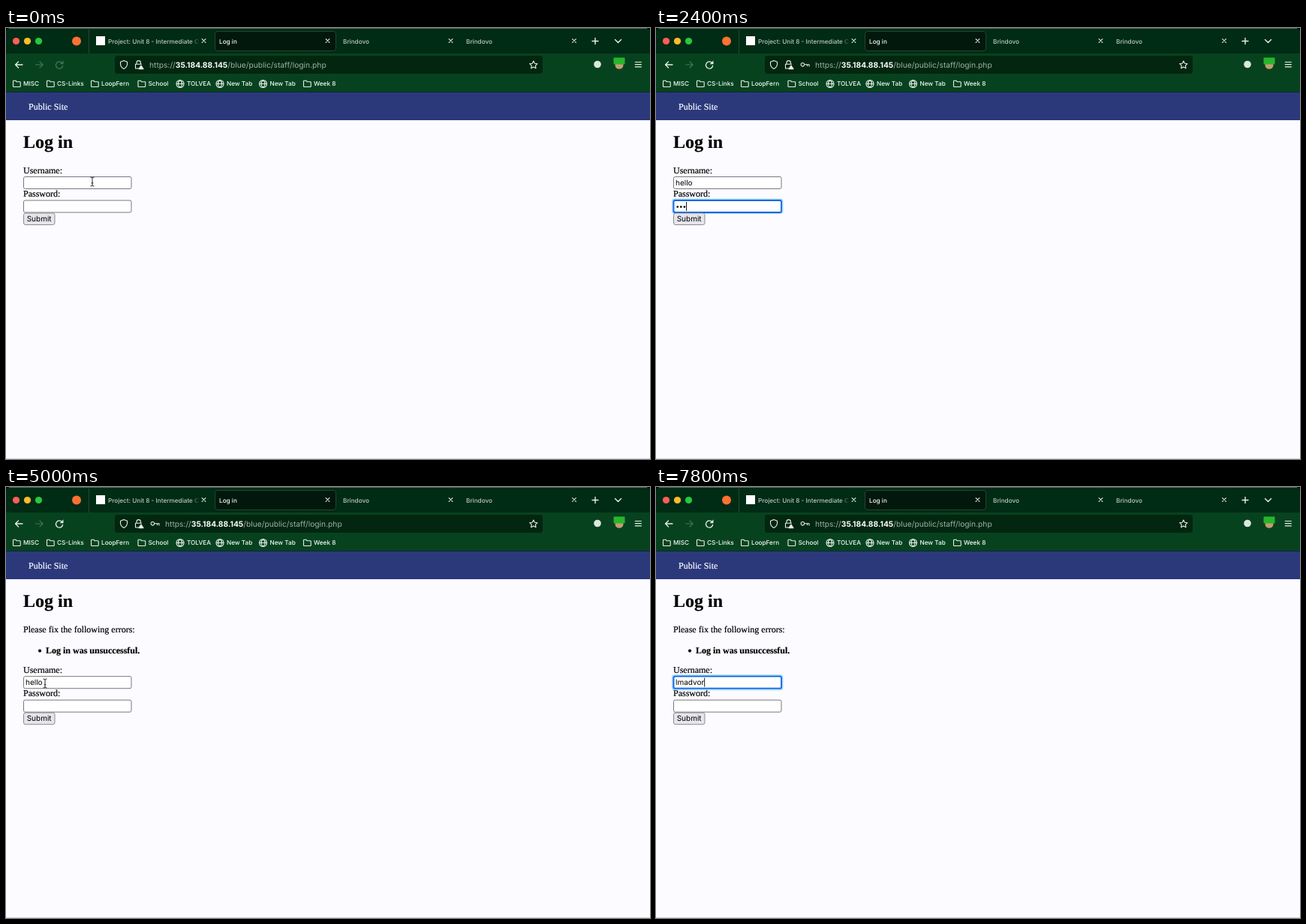
An HTML page for the animation above (8000 ms loop, 858 px wide and 575 px high).

```html
<!DOCTYPE html>
<html lang="en">
<head>
<meta charset="utf-8">
<title>Log in</title>
<style>
html, body { margin: 0; width: 100%; height: 100%; overflow: hidden; background: #fcfbff; }
svg { display: block; width: 858px; height: 575px; }
text { white-space: pre; text-rendering: geometricPrecision; }
.ui { font: 500 8.2px Inter, Roboto, sans-serif; fill: #b9cbbf; }
.bright { fill: #f6faf7; }
.url { font: 10.25px Inter, Roboto, sans-serif; fill: #9db3a4; }
.host { font-weight: 700; fill: #fff; }
.page { font: 12px "Liberation Serif", "Noto Serif", serif; fill: #000; stroke: #000; stroke-width: .2; }
.page .bright { fill: #fff; stroke: #fff; }
.control { font: 10px Inter, Roboto, sans-serif; fill: #000; }
.line { fill: none; stroke: #e8f0ea; stroke-width: 1.1; stroke-linecap: round; stroke-linejoin: round; }
.field { fill: #fff; stroke: #777780; }
.ring { fill: none; stroke: #a9d6fb; stroke-width: 2; }
.focus .field { stroke: #0868e0; stroke-width: 1.8; }
g:not(.focus) > .ring { display: none; }
#reload.off { opacity: .28; }
</style>
</head>
<body>
<svg viewBox="0 0 858 575" xmlns="http://www.w3.org/2000/svg">
  <defs>
    <linearGradient id="fade"><stop stop-color="#002b14" stop-opacity="0"/><stop offset="1" stop-color="#002b14"/></linearGradient>
    <radialGradient id="glow"><stop stop-color="#2c7a47"/><stop offset=".7" stop-color="#25683b"/><stop offset="1" stop-color="#1d5731" stop-opacity="0"/></radialGradient>
    <clipPath id="tabClip"><rect x="279" y="5" width="160" height="25" rx="3"/></clipPath>
    <clipPath id="titleClip"><rect x="130" y="8" width="127" height="20"/></clipPath>
    <path id="folder" d="M.5 8V1.2Q.5.5 1.2.5H3.8L5 2H9.3Q10.2 2 10.2 2.9V8Q10.2 8.8 9.4 8.8H1.3Q.5 8.8.5 8Z"/>
    <path id="globe" d="M5 0A5 5 0 1 1 5 10A5 5 0 1 1 5 0ZM.2 5H9.8M5 0C1.5 3 1.5 7 5 10C8.5 7 8.5 3 5 0"/>
    <path id="close" d="M-2.4-2.4L2.4 2.4M2.4-2.4L-2.4 2.4"/>
  </defs>

  <rect width="858" height="575" fill="#fcfbff"/>
  <rect width="858" height="35" fill="#002b14"/>
  <rect y="34" width="858" height="52" fill="#07421f"/>
  <path d="M0 0H5Q0 0 0 5ZM858 0H853Q858 0 858 5Z" fill="#000"/>
  <path d="M4 .5H854" stroke="#5c6a61"/>
  <path d="M110.5 2V34" stroke="#24492f"/>
  <circle cx="13.5" cy="17.5" r="4.6" fill="#fe5f57"/>
  <circle cx="28.5" cy="17.5" r="4.6" fill="#febc2e"/>
  <circle cx="43.5" cy="17.5" r="4.6" fill="#28c840"/>
  <circle cx="94" cy="17.5" r="6" fill="#ff7033"/>
  <rect x="120" y="11" width="12" height="12" fill="#fff"/>

  <rect x="278.5" y="4.5" width="161" height="26" rx="3.5" fill="#03180d" stroke="#22452f"/>
  <g clip-path="url(#tabClip)"><circle id="burst" cx="284" cy="17" fill="url(#glow)"/></g>
  <g class="ui">
    <text x="136" y="20.7" clip-path="url(#titleClip)">Project: Unit 8 - Intermediate C</text>
    <rect x="246" y="8" width="12" height="20" fill="url(#fade)"/>
    <text class="bright" x="284" y="20.7">Log in</text>
    <text x="449" y="20.7">Brindovo</text>
    <text x="613" y="20.7">Brindovo</text>
  </g>
  <g class="line">
    <use href="#close" x="263.5" y="17"/><use href="#close" x="428.5" y="17"/>
    <use href="#close" x="592.5" y="17"/><use href="#close" x="757" y="17"/>
    <path d="M781 17.5H789M785 13.5V21.5M811.5 15.5L815.5 19.5L819.5 15.5" stroke-width="1.4"/>
    <path d="M22 49H12.5M16.5 45L12.5 49L16.5 53" stroke-width="1.3"/>
    <path d="M39.5 49H49M45 45L49 49L45 53" stroke="#487357" style="stroke:#487357"/>
    <g id="reload">
      <path d="M74.6 46.6A4.6 4.6 0 1 0 75.6 50.3" stroke-width="1.3"/>
      <path d="M76.2 44.2V48H72.4Z" fill="#e8f0ea" stroke-width=".5"/>
    </g>
    <path id="stop" d="M67.5 45.5L74.5 52.5M74.5 45.5L67.5 52.5" stroke-width="1.3"/>
  </g>

  <rect x="145" y="37" width="570" height="24" rx="3.5" fill="#032610"/>
  <g class="line">
    <path d="M157 43.5L161.5 45.2V48.5Q161 52.5 157 54.5Q153 52.5 152.5 48.5V45.2Z"/>
    <path d="M174 48V46.3A2.7 2.7 0 0 1 179.4 46.3V48M177 54H172.5V48.2H180.5"/>
    <path d="M180 50L183 54.6H177Z" fill="#e8f0ea"/>
    <path id="key" d="M197.7 48.8A2.3 2.3 0 1 1 193.1 48.8A2.3 2.3 0 1 1 197.7 48.8H204V51M201.5 48.8V50.6"/>
    <path d="M702.8 44L704.4 47.2L708 47.7L705.4 50.2L706 53.8L702.8 52.1L699.6 53.8L700.2 50.2L697.6 47.7L701.2 47.2Z"/>
    <path d="M838.3 45.5H846.3M838.3 48.7H846.3M838.3 51.9H846.3" stroke-width="1.2"/>
  </g>
  <text id="url" class="url" x="191" y="53">https://<tspan class="host">35.184.88.145</tspan>/blue/public/staff/login.php</text>
  <circle cx="788" cy="48.5" r="4.8" fill="#dce7df"/>
  <ellipse cx="817" cy="49.5" rx="5.5" ry="5.3" fill="#c79a72"/>
  <rect x="809.5" y="39.5" width="15" height="9" rx="1" fill="#27b52c"/>
  <g id="bookmarks" class="ui"></g>

  <rect y="85" width="858" height="38" fill="#2b397b"/>
  <path d="M0 85.5H858" stroke="#0c2a35"/>
  <path d="M0 574.5H858" stroke="#d5d4d9"/>
  <g class="page">
    <text class="bright" x="30" y="108.8">Public Site</text>
    <text x="23" y="159.6" style="font-size:24px;font-weight:bold">Log in</text>
    <g id="errors">
      <text x="23" y="194.2">Please fix the following errors:</text>
      <circle cx="45" cy="218.5" r="2"/>
      <text x="53" y="222" font-weight="bold">Log in was unsuccessful.</text>
    </g>
  </g>
  <g id="form">
    <g class="page"><text x="23" y="194.2">Username:</text><text x="23" y="225">Password:</text></g>
    <g id="user">
      <rect class="ring" x="22" y="197" width="146.5" height="19" rx="3"/>
      <rect class="field" x="23.5" y="198.5" width="143.5" height="16" rx="2"/>
      <rect id="selection" x="26" y="200.5" height="12" fill="#a9cdf5"/>
      <text id="name" class="control" x="26" y="210.2"></text>
    </g>
    <g id="pass">
      <rect class="ring" x="22" y="228.5" width="146.5" height="18.5" rx="3"/>
      <rect class="field" x="23.5" y="230" width="143.5" height="16" rx="2"/>
      <g id="dots"></g>
    </g>
    <path id="caret" stroke="#000" stroke-width=".9"/>
    <rect x="23.5" y="247" width="41.5" height="15.5" rx="2.5" fill="#e6e5eb" stroke="#8b8b94"/>
    <text class="control" x="27.7" y="258.2">Submit</text>
  </g>
  <path id="beam" d="M-2.5-6Q0-6 0-4.5Q0-6 2.5-6M0-4.5V4.5M-2.5 6Q0 6 0 4.5Q0 6 2.5 6M-1.3 1.8H1.3" fill="none" stroke="#111" stroke-width=".9"/>
  <path id="arrow" d="M0 0V10.5L2.4 8.3L4.1 12.2L5.9 11.4L4.2 7.6H7.5Z" fill="#000" stroke="#fff" stroke-width=".8"/>
</svg>
<script>
const $ = id => document.getElementById(id);
const LOOP = 8000, STEP = 200;

const bookmarks = [[9, "MISC"], [54, "CS-Links"], [113, "LoopFern"], [175.5, "School"],
  [227, "TOLVEA", 1], [280, "New Tab", 1], [337.5, "New Tab", 1], [396, "Week 8"]];
$("bookmarks").innerHTML = bookmarks.map(([x, label, web]) =>
  `<use class="line" href="#${web ? "globe" : "folder"}" x="${x}" y="${web ? 69.5 : 69.7}"/>
   <text class="bright" x="${x + 14}" y="77.3">${label}</text>`).join("");

$("dots").innerHTML = [0, 1, 2, 3, 4].map(i =>
  `<circle cx="${28.7 + i * 4.6}" cy="238.6" r="1.35"/>`).join("");

// Each entry changes only the listed properties.
const changes = [
  [0, { name: "", dots: 0, focus: "", selected: false, failed: false, key: false, reload: "off", burst: 0, pointer: ["beam", 115, 205] }],
  [200, { reload: "on" }],
  [400, { focus: "user" }],
  [800, { name: "h", pointer: null }],
  [1000, { name: "he" }],
  [1200, { name: "hel" }],
  [1400, { name: "hell" }],
  [1600, { name: "hello" }],
  [1800, { focus: "pass" }],
  [2000, { dots: 1, key: true }],
  [2200, { dots: 2 }],
  [2400, { dots: 3 }],
  [2600, { dots: 4 }],
  [2800, { dots: 5 }],
  [3000, { reload: "stop" }],
  [3200, { failed: true, dots: 0, focus: "", reload: "off", burst: 28 }],
  [3400, { burst: 0 }],
  [3800, { reload: "on" }],
  [4200, { pointer: ["arrow", 103, 274] }],
  [4400, { pointer: ["arrow", 99.5, 270] }],
  [4800, { pointer: ["beam", 78, 264] }],
  [5000, { pointer: ["beam", 52, 262] }],
  [5200, { pointer: ["beam", 37, 264] }],
  [5400, { focus: "user" }],
  [5600, { selected: true, pointer: ["beam", 35, 269] }],
  [5800, { pointer: ["beam", 35, 272] }],
  [6600, { name: "l", selected: false, pointer: null }],
  [6800, { name: "lm" }],
  [7000, { name: "lma" }],
  [7200, { name: "lmad" }],
  [7400, { name: "lmadv" }],
  [7600, { name: "lmadvo" }],
  [7800, { name: "lmadvor" }]
];

const show = (id, on) => $(id).setAttribute("visibility", on ? "visible" : "hidden");
const move = (id, x, y) => $(id).setAttribute("transform", `translate(${x} ${y})`);

function draw(time) {
  const s = Object.assign({}, ...changes.filter(([at]) => at <= time).map(([, change]) => change));

  $("name").textContent = s.name;
  const nameWidth = $("name").getComputedTextLength();
  [...$("dots").children].forEach((dot, i) => dot.setAttribute("visibility", i < s.dots ? "visible" : "hidden"));
  for (const id of ["user", "pass"]) $(id).classList.toggle("focus", s.focus === id);

  const inPass = s.focus === "pass";
  const caretX = inPass ? 26.7 + s.dots * 4.6 : 26.5 + nameWidth;
  $("caret").setAttribute("d", `M${caretX} ${inPass ? 232 : 200.5}v12`);
  show("caret", s.focus && !s.selected);
  $("selection").setAttribute("width", s.selected ? nameWidth : 0);

  show("errors", s.failed);
  move("form", 0, s.failed ? 54.2 : 0);
  show("key", s.key);
  move("url", s.key ? 21 : 0, 0);
  show("reload", s.reload !== "stop");
  show("stop", s.reload === "stop");
  $("reload").classList.toggle("off", s.reload === "off");
  $("burst").setAttribute("r", s.burst);

  for (const id of ["beam", "arrow"]) {
    const active = s.pointer && s.pointer[0] === id;
    show(id, active);
    if (active) move(id, s.pointer[1], s.pointer[2]);
  }
}

const start = performance.now();
let drawn = -1;
function tick() {
  const time = Math.floor((performance.now() - start) % LOOP / STEP) * STEP;
  if (time !== drawn) draw(drawn = time);
  requestAnimationFrame(tick);
}
tick();
</script>
</body>
</html>
```
